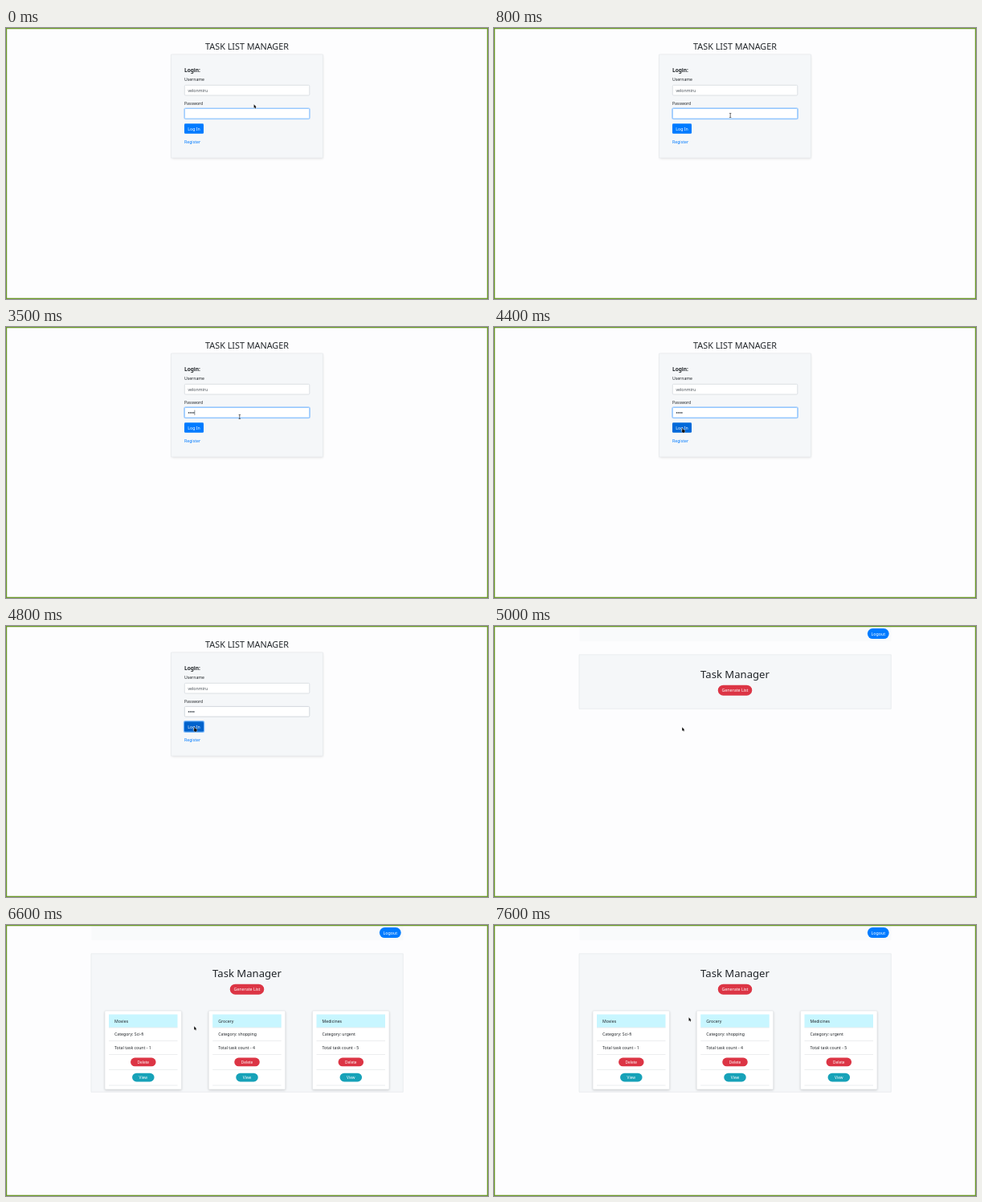
Animation of 600 by 338 pixels, one loop 8 s. Source, as an HTML page with a canvas:

```html
<!DOCTYPE html>
<html lang="en">
<head>
<meta charset="utf-8">
<title>Task list manager</title>
<style>
html, body { margin: 0; width: 100%; height: 100%; overflow: hidden; background: #fdfdfe; }
canvas { display: block; width: 600px; height: 338px; }
</style>
</head>
<body>
<canvas id="stage"></canvas>
<script>
const W = 600, H = 338, LOOP = 8000, TICK = 100;
const FONT = '"Noto Sans", "Open Sans", sans-serif';
const BLUE = '#007bff', RED = '#dc3545', TEAL = '#17a2b8', INK = '#212529';
const canvas = document.getElementById('stage');
const ctx = canvas.getContext('2d');
const dpr = window.devicePixelRatio || 1;
canvas.width = W * dpr;
canvas.height = H * dpr;

function text(str, x, y, size, { color = INK, weight = 400, align = 'left' } = {}) {
  ctx.font = `${weight} ${size}px ${FONT}`;
  ctx.textAlign = align;
  ctx.fillStyle = color;
  ctx.fillText(str, x, y);
}

function box(x, y, w, h, { fill, stroke, radius = 0, shadow = 0, line = 0.7 }) {
  ctx.save();
  ctx.beginPath();
  ctx.roundRect(x, y, w, h, radius);
  if (fill) {
    if (shadow) {
      ctx.shadowColor = `rgba(0,0,0,${shadow})`;
      ctx.shadowBlur = 3 * dpr;
      ctx.shadowOffsetY = dpr;
    }
    ctx.fillStyle = fill;
    ctx.fill();
    ctx.shadowColor = 'transparent';
  }
  if (stroke) {
    ctx.strokeStyle = stroke;
    ctx.lineWidth = line;
    ctx.stroke();
  }
  ctx.restore();
}

function pill(label, cx, cy, w, h, color, size) {
  box(cx - w / 2, cy - h / 2, w, h, { fill: color, radius: h / 2 });
  text(label, cx, cy + size * 0.36, size, { color: '#fff', align: 'center' });
}

function focusGlow(x, y, w, h, alpha) {
  box(x - 0.5, y - 0.5, w + 1, h + 1, { stroke: `rgba(0,123,255,${alpha})`, radius: 1.8, line: 1.4 });
}

function loginPage(t, pointer) {
  text('TASK LIST MANAGER', 300, 27.2, 10.8, { weight: 500, align: 'center' });
  box(205.5, 33, 189, 129, { fill: '#f5f7f9', stroke: '#e6e8eb', shadow: 0.12 });
  text('Login:', 222, 55.4, 6.5, { weight: 600 });
  text('Username', 222, 66.3, 5.15);
  text('Password', 222, 95.7, 5.15);

  box(222.3, 71.3, 155.5, 12.7, { fill: '#fff', stroke: '#ced4da', radius: 1.3 });
  text('velonmiru', 226.4, 79.5, 5.2, { color: '#495057' });

  const submitted = t >= 4600;
  if (!submitted) focusGlow(222.3, 100.4, 155.5, 12.7, t < 500 ? 0.18 : 0.28);
  box(222.3, 100.4, 155.5, 12.7, { fill: '#fff', stroke: submitted ? '#ced4da' : '#80bdff', radius: 1.3, line: 0.9 });

  const typed = [2400, 2600, 2800, 3000].filter(at => t >= at).length;
  ctx.fillStyle = '#495057';
  for (let i = 0; i < typed; i++) {
    ctx.beginPath();
    ctx.arc(227.5 + i * 2.1, 106.9, 0.85, 0, 7);
    ctx.fill();
  }
  const caretOn = [[1500, 1700], [2400, 3100], [3500, 4000]].some(([a, b]) => t >= a && t < b);
  if (caretOn) ctx.fillRect(226.2 + typed * 2.1, 103.6, 0.6, 6.4);

  const hover = pointer.x < 246 && pointer.y > 119;
  if (submitted) focusGlow(222, 119.2, 24, 12.6, 0.5);
  box(222, 119.2, 24, 12.6, { fill: submitted ? '#0062cc' : hover ? '#0069d9' : BLUE, radius: 1.3 });
  text('Log In', 234, 127.5, 5.2, { color: '#fff', align: 'center' });
  text('Register', 222, 143.5, 5.2, { color: BLUE });
}

function card(x, title, category, count) {
  box(x, 107, 95.5, 98, { fill: '#fff', stroke: '#e3e6e8', radius: 1, shadow: 0.2 });
  ctx.fillStyle = '#c8f6ff';
  ctx.fillRect(x + 5, 111.5, 85.5, 16.3);
  ctx.fillStyle = '#dfe2e4';
  for (const y of [127.7, 144.2, 161, 180.3, 199.7]) ctx.fillRect(x + 5, y, 85.5, 0.6);
  text(title, x + 12, 121.9, 5.2);
  text('Category: ' + category, x + 12, 138.2, 5.2);
  text('Total task count - ' + count, x + 12, 154.9, 5.2);
  pill('Delete', x + 47.8, 170.9, 31.5, 10.6, RED, 4.75);
  pill('View', x + 47.8, 190.1, 27.5, 10.6, TEAL, 4.75);
}

function taskPage(t) {
  const listed = t >= 5100;
  ctx.fillStyle = '#f9fafb';
  ctx.fillRect(106.5, 1, 388, 18);
  pill('Logout', 478.3, 9.6, 26.8, 13, BLUE, 5.3);
  box(106, 35.8, 388.3, listed ? 172.5 : 67.5, { fill: '#f5f7f9', stroke: '#e4e8ea' });
  text('Task Manager', 300, 65, 13.1, { weight: 500, align: 'center' });
  pill('Generate List', 300, 80.2, 42.4, 13, RED, 5.3);
  if (listed) {
    card(123, 'Movies', 'Sci-fi', 1);
    card(252.2, 'Grocery', 'shopping', 4);
    card(381.5, 'Medicines', 'urgent', 5);
  }
}

const moves = [
  { start: 500, steps: 7, from: [308.6, 95.3], to: [290.8, 112] },
  { start: 3700, steps: 8, from: [290.8, 112], to: [234.2, 126.3] },
  { start: 7000, steps: 7, from: [234.2, 126.3], to: [242.5, 115.3] },
];

function pointerAt(t) {
  const move = moves.findLast(m => t >= m.start) || moves[0];
  const step = Math.floor((t - move.start) / TICK) + 1;
  const p = Math.min(1, Math.max(0, step / move.steps));
  const ease = t < move.start ? 0 : p * (2 - p);
  const [x, y] = move.from.map((a, i) => a + (move.to[i] - a) * ease);
  return { x, y };
}

function polygon(points) {
  ctx.beginPath();
  points.forEach(([x, y]) => ctx.lineTo(x, y));
  ctx.closePath();
  ctx.lineJoin = 'round';
  ctx.strokeStyle = '#fff';
  ctx.lineWidth = 0.7;
  ctx.stroke();
  ctx.fillStyle = '#111';
  ctx.fill();
}

function drawPointer({ x, y }, onLogin) {
  const inField = onLogin && x > 222 && y > 100.4 && y < 113.1;
  const onButton = onLogin && x < 246 && y > 119;
  ctx.save();
  ctx.translate(x, y);
  if (inField) {
    ctx.fillStyle = '#333';
    ctx.fillRect(-0.3, -2.8, 0.7, 5.6);
    ctx.fillRect(-1.2, -3, 2.5, 0.6);
    ctx.fillRect(-1.2, 2.4, 2.5, 0.6);
  } else if (onButton) {
    polygon([[0, 0], [1, 0], [1.2, 1.8], [3.3, 2.3], [3.5, 4], [2.8, 5.4], [0.6, 5.4], [-1, 3.2], [0, 3.3]]);
  } else {
    polygon([[0, 0], [0, 4.4], [1, 3.6], [1.8, 5.2], [2.6, 4.8], [1.9, 3.3], [3.1, 3.1]]);
  }
  ctx.restore();
}

function render(t) {
  const onLogin = t < 5000;
  const pointer = pointerAt(t);
  ctx.setTransform(dpr, 0, 0, dpr, 0, 0);
  ctx.fillStyle = '#fdfdfe';
  ctx.fillRect(0, 0, W, H);
  if (onLogin) loginPage(t, pointer);
  else taskPage(t);
  drawPointer(pointer, onLogin);
  box(0.6, 0.6, W - 1.2, H - 1.2, { stroke: '#6b9a28', line: 1.2 });
}

let began;
function frame(now) {
  began ??= now;
  render((now - began) % LOOP);
  requestAnimationFrame(frame);
}
render(0);
requestAnimationFrame(frame);
</script>
</body>
</html>
```
